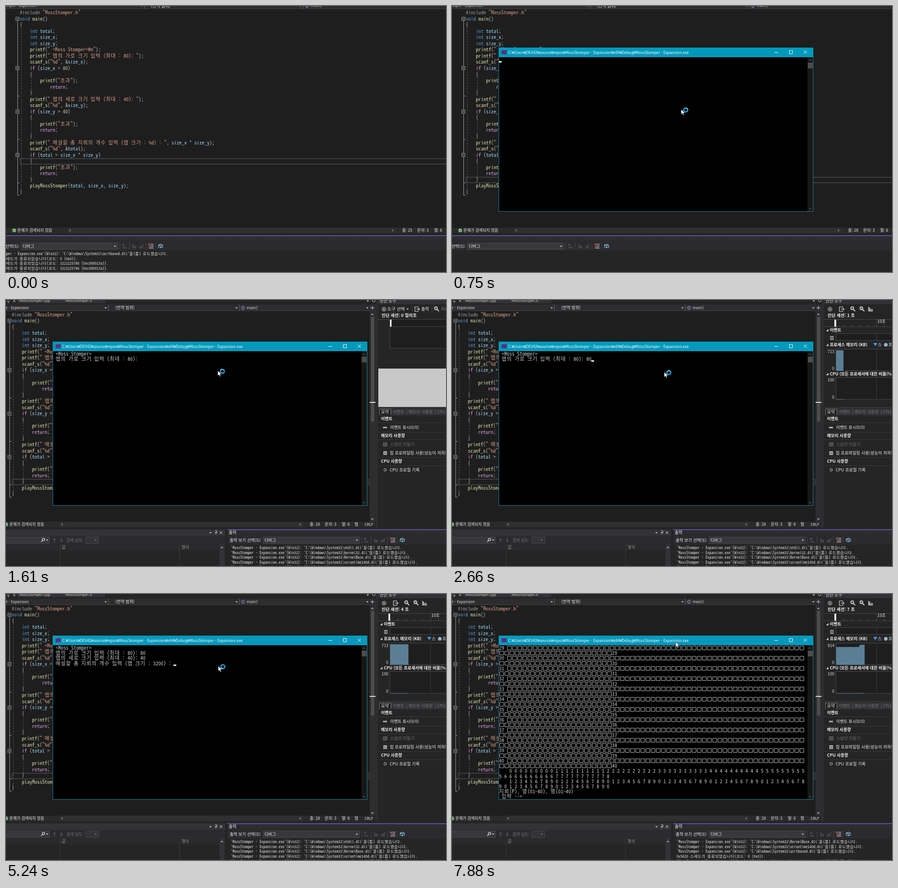
An HTML page that plays this animation: 962 by 582 pixels, repeating every 8 s.

```html
<!DOCTYPE html>
<html lang="ko">
<head>
<meta charset="utf-8">
<title>Console demo</title>
<style>
html, body { margin: 0; width: 100%; height: 100%; overflow: hidden; background: #1e1e1e; }
svg { display: block; width: 962px; height: 582px; }
text { white-space: pre; font-family: "Noto Sans CJK KR", "Noto Sans", sans-serif; }
.mono { font-family: "Noto Sans Mono CJK KR", "Noto Sans Mono", "Noto Sans CJK KR", monospace; }
</style>
</head>
<body>
<svg id="stage" viewBox="0 0 962 582"></svg>
<script>
const NS = 'http://www.w3.org/2000/svg';
const stage = document.getElementById('stage');
const LOOP = 8000;

function el(parent, tag, attrs = {}) {
  const e = document.createElementNS(NS, tag);
  for (const k in attrs) e.setAttribute(k, attrs[k]);
  parent.appendChild(e);
  return e;
}
const group = (p, x = 0, y = 0) => el(p, 'g', { transform: `translate(${x} ${y})` });
const rect = (p, x, y, width, height, fill, stroke) =>
  el(p, 'rect', { x, y, width, height, fill, ...(stroke && { stroke }) });
const path = (p, d, stroke, width = 1, fill = 'none') =>
  el(p, 'path', { d, stroke, 'stroke-width': width, fill });
// y is the middle of the line
function label(p, x, y, str, size = 9.1, fill = '#f0f0f0', extra = {}) {
  const e = el(p, 'text', { x, y: y + size * 0.36, 'font-size': size, fill, ...extra });
  e.textContent = str;
  return e;
}
const BOLD = { 'font-weight': 700 };
const END = { 'text-anchor': 'end' };
const span = c => c >= '\uac00' ? 2 : 1;

// Text on a fixed grid: Hangul takes two cells
function grid(p, x, y, str, cw, fill, col = 0) {
  const xs = [];
  for (const c of str) {
    xs.push((x + col * cw).toFixed(2));
    col += span(c);
  }
  el(p, 'text', { class: 'mono', x: xs.join(' '), y, 'font-size': cw * 2, fill })
    .textContent = str.replace(/ /g, '\u00a0');
  return col;
}
const arrow = (p, x, y, fill = '#ccc') => path(p, `M${x - 2.5} ${y - 1}h5l-2.5 3z`, 'none', 0, fill);
const chevron = (p, x, y, d) => path(p, `M${x - 2.5} ${y + d}l2.5 ${-2 * d}l2.5 ${2 * d}`, '#8a8a8a');
const show = (e, on) => e.setAttribute('visibility', on ? 'inherit' : 'hidden');

rect(stage, 0, 0, 962, 582, '#1e1e1e');

/* ---------- code editor ---------- */
const CODE = `#include "MossStomper.h"
void main()
{
    int total;
    int size_x;
    int size_y;
    printf(" <Moss Stomper>₩n");
    printf(" 맵의 가로 크기 입력 (최대 : 80): ");
    scanf_s("%d", &size_x);
    if (size_x > 80)
    {
        printf("초과");
            return;
    }
    printf(" 맵의 세로 크기 입력 (최대 : 40): ");
    scanf_s("%d", &size_y);
    if (size_y > 40)
    {
        printf("초과");
        return;
    }
    printf(" 매설할 총 지뢰의 개수 입력 (맵 크기 : %d) : ", size_x * size_y);
    scanf_s("%d", &total);
    if (total > size_x * size_y)
    {
        printf("초과");
        return;
    }
    playMossStomper(total, size_x, size_y);
}`.split('\n');
const STYLES = [
  [/^"/, '#d69d85'], [/^#/, '#9b9b9b'], [/^(int|void)$/, '#569cd6'], [/^(if|return)$/, '#d8a0df'],
  [/^(total|size_[xy])$/, '#9cdcfe'], [/^\d/, '#b5cea8'], [/^[a-z]/, '#dcdcaa']
];
const tint = s => (STYLES.find(([re]) => re.test(s)) || [0, '#b8b8b8'])[1];
const PITCH = 13.55;
const rowY = i => 14 + PITCH * i;

const editor = group(stage);
const current = el(editor, 'rect', { x: 31, height: 12, fill: 'none', stroke: '#464646', 'stroke-width': 1.6 });
path(editor, 'M25.5 32V414h4M25.5 197h4M25.5 292h4M25.5 387h4', '#a5a5a5');
for (const i of [1, 9, 16, 23]) {
  const y = Math.round(rowY(i));
  rect(editor, 21.5, y - 3.5, 7, 7, '#1e1e1e', '#a5a5a5');
  path(editor, `M23 ${y}h4`, '#ddd');
}
for (const [x, a, b] of [[33.5, 3, 28], [55.5, 11, 12], [55.5, 18, 19], [55.5, 25, 26]])
  path(editor, `M${x} ${rowY(a) - 7}V${rowY(b) + 7}`, '#666').setAttribute('stroke-dasharray', '3 3');
CODE.forEach((line, i) => {
  let col = 0;
  for (const s of line.match(/".*?"|#?\w+|\s+|[^\w\s"]+/g))
    col = s.trim() ? grid(editor, 30.2, rowY(i) + 4, s, 5.53, tint(s), col) : col + s.length;
});

/* ---------- navigation and status bars ---------- */
function navBar(p, y, right, name, seps, scope) {
  rect(p, 0, y - 7, right, 14, '#2d2d30');
  path(p, `M0 ${y + 6.5}H${right}`, '#434346');
  label(p, name, y, 'MossStomper - Expansion', 8.2, '#e0e0e0', END);
  label(p, scope, y, '(전역 범위)');
  seps.forEach(x => {
    path(p, `M${x} ${y - 7}v14`, '#55555a', 1.5);
    arrow(p, x - 6, y);
  });
  const x = seps[1] + 8;
  path(p, `M${x} ${y - 4}l3.5 2v4l-3.5 2l-3.5 -2v-4zl0 8`, '#a88ad0');
  label(p, x + 8, y, 'main()', 8, '#e0e0e0');
}
function statusBar(p, dx, right, end) {
  rect(p, 0, 485, right, 12, '#2a2a2c');
  rect(p, 134 + dx, 485, end - 134 - dx, 12, '#303032');
  el(p, 'circle', { cx: 18 + dx, cy: 491, r: 4, fill: '#7fc98a' });
  path(p, `M${16 + dx} 491l1.5 1.7l2.8 -3.2`, '#1e1e1e');
  label(p, 25 + dx, 491, '문제가 검색되지 않음', 8.6);
  path(p, `M${141 + dx} 488v6l-3 -3zM${end - 8} 488v6l3 -3z`, 'none', 0, '#808080');
  const row = label(p, end + 14, 491, '', 8.6);
  label(p, end + 47, 491, '문자: 3', 8.6);
  label(p, end + 84, 491, '열: 6', 8.6);
  return row;
}
const plain = group(stage), debug = group(stage);
navBar(plain, -0.5, 962, 67.5, [303, 650], 317);
const plainRow = statusBar(plain, 0, 962, 852);
rect(plain, 0, 497, 962, 5, '#252526');

rect(debug, 0, 0, 813, 10, '#252526');
rect(debug, 24, 0, 193, 7, '#333337');
label(debug, 29, 1.5, 'MossStomper.cpp', 8, '#ddd');
label(debug, 130, 1.5, 'MossStomper.h', 8, '#ddd');
path(debug, 'M2 3h6M5 3v4M15 -1l6 6m0 -6l-6 6', '#ccc');
arrow(debug, 791, 2);
el(debug, 'circle', { cx: 804, cy: 1, r: 3, fill: 'none', stroke: '#ccc' });
navBar(debug, 17, 795, 50, [224, 510], 239);
arrow(debug, 790, 17);
rect(debug, 795, 10, 13, 475, '#2e2e31');
path(debug, 'M797 17h8M801 13v8', '#ddd');
path(debug, 'M798 33h6l-3 -4zM798 478h6l-3 4z', 'none', 0, '#999');
rect(debug, 798, 37, 7, 229, '#4d4d4d');
rect(debug, 795, 223, 13, 2, '#e0e0e0');
const debugRow = statusBar(debug, -17.5, 808, 650);
label(debug, 762, 491, '탭', 8.6);
label(debug, 784, 491, 'CRLF', 8);
rect(debug, 0, 497, 962, 85, '#252526');
rect(debug, 808, 0, 5, 497, '#2d2d30');

/* ---------- watch panel ---------- */
rect(debug, 0, 502, 479, 80, '#252526');
rect(debug, 0, 502, 479, 14, '#333337');
rect(debug, 0, 516, 479, 18, '#2b2b2e');
arrow(debug, 447, 509);
path(debug, 'M456 509h6M457 505h4v4M459 509v4M467 506l6 6m0 -6l-6 6', '#ddd');
rect(debug, -1, 518.5, 96, 14, '#38383b', '#48484c');
el(debug, 'circle', { cx: 82, cy: 524, r: 2.6, fill: 'none', stroke: '#ddd', 'stroke-width': 1.3 });
path(debug, 'M80 526l-3 3', '#ddd', 1.6);
arrow(debug, 90, 525);
path(debug, 'M106 530v-8l-3 3m3 -3l3 3M121 521v8l-3 -3m3 3l3 -3', '#707070');
label(debug, 132, 525.5, '검색 심도:', 8.8, '#777');
rect(debug, 174.5, 518.5, 28, 14, '#333337', '#48484c');
arrow(debug, 196, 525, '#777');
rect(debug, 0, 534, 467, 14, '#2a2a2c');
path(debug, 'M118.5 534v48M379.5 534v48', '#38383b');
label(debug, 122, 541, '값', 8.8, '#999');
label(debug, 384, 541, '형식', 8.8, '#999');
rect(debug, 467, 534, 11, 48, '#333337');
path(debug, 'M469 543h6l-3 -4z', 'none', 0, '#999');

/* ---------- diagnostics panel ---------- */
const diag = group(debug);
rect(diag, 813, 0, 149, 497, '#252526');
rect(diag, 813, 0, 149, 9, '#333337');
label(diag, 817, 2, '진단 도구');
el(diag, 'circle', { cx: 826.5, cy: 20, r: 4, fill: 'none', stroke: '#ddd', 'stroke-width': 1.6, 'stroke-dasharray': '2 1' });
el(diag, 'circle', { cx: 826.5, cy: 20, r: 1.6, fill: '#ddd' });
const session = label(diag, 821, 34, '', 9.4, '#f0f0f0', BOLD);
function exportIcon(p, x) {
  path(p, `M${x + 3} 17v-2h-7v10h7v-2M${x - 1} 20h7l-2.5 -2.5m2.5 2.5l-2.5 2.5`, '#ddd', 1.2);
}
function lens(p, x, plus) {
  el(p, 'circle', { cx: x - 1, cy: 18, r: 3.3, fill: '#888', stroke: '#ddd', 'stroke-width': 1.2 });
  path(p, `M${x + 1.5} 20.5l4 4`, '#ddd', 1.8);
  path(p, `M${x - 3} 18h4${plus ? `M${x - 1} 16v4` : ''}`, '#222');
}
const early = group(diag), late = group(diag);
label(early, 834, 20, '도구 선택', 9.5);
arrow(early, 878, 19.5);
path(early, 'M888.5 12v15M931.5 12v15', '#48484c');
exportIcon(early, 898);
label(early, 908, 20, '출력');
lens(early, 941, true);
label(early, 951, 20, '확대', 9.1, '#777');
rect(early, 839.5, 42.5, 130, 63, '#1e1e1e', '#48484c');
path(early, 'M813 42.5h149M839 58.5h123', '#48484c');
rect(early, 839.5, 43, 3.5, 15.5, '#e8e8e8');
rect(early, 814, 150, 148, 84, '#c8c8c8');

exportIcon(late, 851);
lens(late, 876, true);
lens(late, 896, false);
path(late, 'M911 15v9h9M913 23v-6M916 23v-4M919 23v-3', '#ddd', 1.5);
path(late, 'M813 42.5h149M813 58.5h149', '#48484c');
for (let i = 1; i < 7; i++) path(late, `M${840 + i * 17.6} 58v-4`, '#666');
rect(late, 836, 43, 4, 15.5, '#e8e8e8');
label(late, 930, 47, '10초', 8.8);
for (const [y, s] of [[66, '이벤트'], [98, '프로세스 메모리 (KB)'], [162, 'CPU (모든 프로세서에 대한 비율(%))']]) {
  path(late, `M818 ${y + 2.5}h5v-5z`, 'none', 0, '#ddd');
  label(late, 826, y, s, 9, '#f0f0f0', BOLD);
}
for (const [y, h] of [[73.5, 15], [107.5, 47], [169.5, 48]]) rect(late, 839.5, y, 130, h, '#1e1e1e', '#48484c');
rect(late, 827.5, 79.5, 6, 7, 'none', '#ddd');
path(late, 'M830.5 79v8', '#ddd');
path(late, 'M921 94h9l-4.5 7z', 'none', 0, '#3d9be9');
label(late, 931, 98, '스');
el(late, 'circle', { cx: 948.5, cy: 98, r: 4, fill: '#8fb8d0' });
label(late, 954, 98, '프로');
const memory = path(late, '', 'none', 0, '#5a7f95');
const cpu = path(late, '', '#5a7f95');
path(late, 'M928.5 43v15M928.5 74v15M928.5 108v47M928.5 170v48', '#3c3c40');
const peak = label(late, 836, 112.5, '713', 8.8, '#ddd', END);
for (const [y, s] of [[150, '0'], [175, '100'], [213, '0']]) label(late, 836, y, s, 8.8, '#ddd', END);

rect(diag, 813, 234, 149, 3, '#333337');
rect(diag, 842, 238, 120, 13, '#333337');
rect(diag, 816.5, 238.5, 25, 13, '#1e1e1e', '#888');
label(diag, 820, 245, '요약', 9.3);
for (const [x, s] of [[846, '이벤트'], [880, '메모리 사용량'], [942, 'CPU 사용량']]) label(diag, x, 245, s, 9.1, '#777');
path(diag, 'M876.5 238v13M938.5 238v13', '#55555a');
path(diag, 'M813 251.5h149M813 268.5h149M813 289.5h149M813 305.5h149M813 344.5h149M813 362.5h149', '#38383b');
for (const [y, s] of [[260, '이벤트'], [297, '메모리 사용량'], [353, 'CPU 사용량']]) label(diag, 820, y, s, 9, '#f0f0f0', BOLD);
label(diag, 840, 279, '이벤트 표시(0/0)', 8.9);
label(diag, 840, 316, '스냅샷 만들기', 9.1, '#707070');
label(diag, 839, 335, '힙 프로파일링 사용(성능이 저하될 수 있음)', 9.2);
label(diag, 839, 371.5, 'CPU 프로필 기록');
path(diag, 'M824 279h9M826 277v4M829 277v4M831.5 277v4', '#ccc', 1.3);
rect(diag, 825, 312.5, 8, 7, 'none', '#888');
el(diag, 'circle', { cx: 829, cy: 316, r: 1.8, fill: 'none', stroke: '#888' });
rect(diag, 825, 331, 8, 8, '#bbb');
path(diag, 'M826 334h6M826 336.5h6', '#333');
el(diag, 'circle', { cx: 829, cy: 371.5, r: 3, fill: '#444', stroke: '#aaa' });

/* ---------- output panel ---------- */
const output = group(stage);
const SPREAD = 1020;
rect(output, 484, 502, SPREAD, 80, '#2b2b2e');
rect(output, 484, 501.8, SPREAD, 1.5, '#6f63cf');
for (const y of [507.5, 510.5])
  path(output, `M513 ${y}h${SPREAD}`, '#4a4a4e').setAttribute('stroke-dasharray', '1 3');
const heading = label(output, 487, 509, '출력');
label(output, 489, 525.5, '출력 보기 선택(S):', 9);
rect(output, 562.5, 518.5, 210, 14, '#38383b', '#48484c');
label(output, 565, 525.5, '디버그');
arrow(output, 767, 525.5);
path(output, 'M777.5 518v15M798.5 518v15M834.5 518v15M855.5 518v15', '#48484c');
path(output, 'M783 521h4M783 524h5M783 529h9M805 526h8M805 529h8M807 522l-3 2M820 526h8M820 529h8M826 522l3 2', '#5c5c60', 1.3);
path(output, 'M845 521h6M845 524h6M841 527h10M841 530h10', '#ddd');
path(output, 'M840 520l4 4m0 -4l-4 4', '#e05555', 1.4);
path(output, 'M862 529v-6h3M868 523h3v5h-6l2 -2m-2 2l2 2', '#6fb4e8', 1.3);
label(output, 862, 523, 'ab', 6.5, '#ddd');
rect(output, 484, 535, SPREAD, 47, '#252526');
const log = group(output);
const load = dll => `'MossStomper - Expansion.exe'(Win32): 'C:\\Windows\\System32\\${dll}.dll'을(를) 로드했습니다.`;
const quit = (id, code) => `${id} 스레드가 종료되었습니다(코드: ${code}).`;
const ABORT = '3221225786 (0xc000013a)';
const LOGS = [
  [load('ucrtbased'), quit('0x3a1c', '0 (0x0)'), quit('0x2f40', ABORT), quit('0x41d8', ABORT), quit('0x1b64', ABORT)],
  [],
  ['ntdll', 'kernel32', 'KernelBase', 'vcruntime140d', 'ucrtbased'].map(load),
  [...['KernelBase', 'vcruntime140d', 'ucrtbased'].map(load), quit('0x5620', '0 (0x0)'), load('kernel.appcore')]
];
let logKey = -1;
function setLog(key) {
  if (key === logKey) return;
  logKey = key;
  log.replaceChildren();
  LOGS[key].forEach((s, i) => grid(log, 491, 545 + i * 10.7, s, 4.21, '#e6e6e6'));
}

/* ---------- console window ---------- */
const CW = 5.61, CH = 11.22, LEFT = 103, WIDTH = 120;
const win = group(stage);
rect(win, 102.5, 91.5, 687, 358, '#000', '#1688a4');
rect(win, 102, 91, 688, 21, '#0099bc');
rect(win, 108.5, 97, 11, 8.5, '#5c2d7a');
label(win, 123, 101.5, 'C:₩Users₩DEV42₩source₩repos₩MossStomper - Expansion₩x64₩Debug₩MossStomper - Expansion.exe', 8.35, '#fff');
path(win, 'M705 101.5h8M737.5 97.5h7v7h-7zM769 97.5l7 7m0 -7l-7 7', '#fff');
rect(win, 777, 112, 12, 337, '#171717');
rect(win, 778, 124, 10.5, 12.5, '#4d4d4d');
chevron(win, 783, 118.5, 1.2);
chevron(win, 783, 443.5, -1.2);
const screen = group(win);
const caret = rect(win, 0, 0, 6, 3, '#fff');

const two = n => String(n).padStart(2, '0');
const boardRow = i => `${two(i)} ${'□'.repeat(80)}${two(i)}\n`;
const digits = d => '    ' + Array.from({ length: 80 }, (_, i) => two(i + 1)[d] + ' ').join('') + '\n';
const AXIS = digits(0) + digits(1);
const rows = n => Array.from({ length: n }, (_, i) => boardRow(i + 1)).join('');
const typed = (t, s, at) => s.slice(0, Math.max(0, Math.floor((t - at) / 120) + 1));

const SCRIPT = [
  [1100, t => ' <Moss Stomper>\n 맵의 가로 크기 입력 (최대 : 80): ' + typed(t, '80', 2420)],
  [3100, t => '\n 맵의 세로 크기 입력 (최대 : 40): ' + typed(t, '40', 3560)],
  [3900, t => '\n 매설할 총 지뢰의 개수 입력 (맵 크기 : 3200) : ' + typed(t, '100', 5480)],
  [6100, () => '\n']
];
const BOARD = [
  [6830, () => AXIS + rows(40) + AXIS + '지뢰(P), 열(01~80), 행(01~40)\n 입력 --> '],
  [6760, () => AXIS + rows(24) + '25 ' + '□'.repeat(60)],
  [6690, () => AXIS + rows(12)],
  [6620, () => AXIS + rows(1)]
];
const wide = c => c === '□' ? 2 : span(c);
function wrap(str) {
  const out = [''];
  let n = 0;
  for (const c of str) {
    if (c === '\n') { out.push(''); n = 0; continue; }
    if (n + wide(c) > WIDTH) { out.push(''); n = 0; }
    out[out.length - 1] += c;
    n += wide(c);
  }
  return out.slice(-30);
}
let shown = null;
function setScreen(str) {
  if (str === shown) return;
  shown = str;
  screen.replaceChildren();
  const lines = wrap(str);
  let boxes = '', col = 0;
  lines.forEach((line, i) => {
    const mid = 118 + i * CH;
    col = 0;
    for (const part of line.match(/□+|[^□]+/g) || []) {
      if (part[0] !== '□') { col = grid(screen, LEFT, mid + 4, part, CW, '#ccc', col); continue; }
      for (const _ of part) {
        boxes += `M${(LEFT + col * CW + 1.4).toFixed(2)} ${(mid - 4.2).toFixed(2)}h8.4v8.4h-8.4z`;
        col += 2;
      }
    }
  });
  path(screen, boxes, '#ccc', 0.94);
  caret.setAttribute('x', LEFT + col * CW - 0.5);
  caret.setAttribute('y', 118 + (lines.length - 1) * CH + 2.7);
}

/* ---------- pointer ---------- */
const pointer = group(stage);
path(pointer, 'M0 0v11.5l2.7 -2.5l1.9 4.2l1.9 -0.9l-1.9 -4h3.7z', '#000', 0.7, '#fff');
const busy = group(pointer);
el(busy, 'circle', { cx: 10, cy: 1.5, r: 4.3, fill: 'none', stroke: '#2aa5e0', 'stroke-width': 2.6 });
const glint = el(busy, 'circle', { cx: 10, cy: 1.5, r: 4.3, fill: 'none', stroke: '#8fdcff', 'stroke-width': 1.6, 'stroke-dasharray': '5 22.02' });
const TRACK = [[0, 501, 226], [880, 501, 226], [1500, 463, 154.5], [1800, 463, 154.5], [2300, 464, 157.5], [7500, 464, 157.5], [7860, 489, 104.5], [8000, 489, 104.5]];
function at(t) {
  const i = TRACK.findIndex((k, n) => n && t <= k[0]);
  const [a, b] = [TRACK[i - 1], TRACK[i]];
  const u = (t - a[0]) / (b[0] - a[0]), e = u * u * (3 - 2 * u);
  return [a[1] + (b[1] - a[1]) * e, a[2] + (b[2] - a[2]) * e];
}

/* ---------- timeline ---------- */
function draw(t) {
  const dbg = t >= 810, open = t >= 560, graph = t >= 1880, rescaled = t >= 6930;
  show(plain, !dbg);
  show(debug, dbg);
  show(heading, dbg);
  editor.setAttribute('transform', dbg ? 'translate(-17.5 17.5)' : '');
  output.setAttribute('transform', dbg ? '' : 'translate(-528.5 0)');

  const line = 24 + Math.min(3, Math.floor(t / 70));
  current.setAttribute('y', rowY(line) - 5.2);
  current.setAttribute('width', dbg ? 780 : 940);
  plainRow.textContent = debugRow.textContent = `줄: ${line + 1}`;
  setLog(t < 400 ? 0 : t < 1000 ? 1 : rescaled ? 3 : 2);

  show(early, !graph);
  show(late, graph);
  session.textContent = graph ? `진단 세션: ${Math.floor((t - 880) / 1000)} 초` : '진단 세션: 0 밀리초';
  const tick = 7160 + 195 * Math.floor((t - 7160) / 195);
  const edge = Math.max(841, 840 + 8.8 * (tick - 680) / 1000);
  peak.textContent = rescaled ? '814' : '713';
  memory.setAttribute('d', rescaled
    ? `M840 155V116H889L893 111H${edge}V155z`
    : `M840 155V110H${edge}V155z`);
  cpu.setAttribute('d', `M840 217.3H${Math.min(edge, 890)}` + (rescaled ? `l3 -1l3 1H${edge}` : ''));

  show(win, open);
  show(pointer, open);
  const board = BOARD.find(b => t >= b[0]);
  setScreen(SCRIPT.map(([from, f]) => t >= from ? f(t) : '').join('') + (board ? board[1]() : ''));
  const writing = (t > 2420 && t < 2900) || (t > 6620 && t < 6960);
  show(caret, open && (writing || Math.floor((t - 750) / 530) % 2 === 0));

  const [x, y] = at(t);
  pointer.setAttribute('transform', `translate(${x.toFixed(1)} ${y.toFixed(1)})`);
  show(busy, open && t < 6620);
  glint.setAttribute('transform', `rotate(${t * 0.36 % 360} 10 1.5)`);
}
function frame() {
  draw(performance.now() % LOOP);
  requestAnimationFrame(frame);
}
frame();
</script>
</body>
</html>
```
